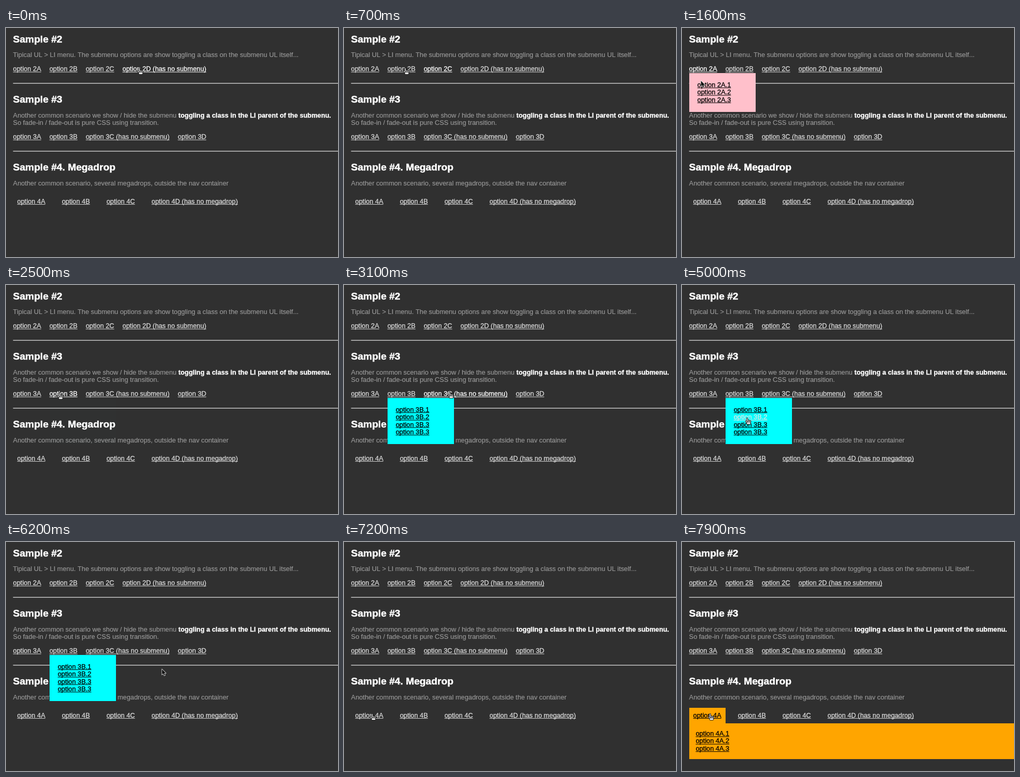
Write an HTML page with a canvas that moves like this. It is 640 px wide and 442 px high and loops after 8000 ms.

```html
<!DOCTYPE html>
<html lang="en">
<head>
<meta charset="utf-8">
<title>Menu samples</title>
<style>
html, body { margin: 0; width: 100%; height: 100%; overflow: hidden; background: #303030; }
canvas { display: block; }
</style>
</head>
<body>
<canvas id="stage" width="640" height="442"></canvas>
<script>
const ctx = document.getElementById('stage').getContext('2d');
const LOOP = 8000, LEFT = 13.6, SIZE = 12.8, LINE = 14.4, ASCENT = 11.2;
const FAMILY = '"Liberation Sans", Arial, Helvetica, sans-serif';
const BODY = SIZE + 'px ' + FAMILY;
const BOLD = 'bold ' + BODY;
const TITLE = 'bold ' + SIZE * 1.5 + 'px ' + FAMILY;

const clamp = v => Math.max(0, Math.min(1, v));
const ease = v => v * v * (3 - 2 * v);

function row(x, base, gap, names) {
  ctx.font = BODY;
  return names.map(text => {
    const link = { text, x, base, w: ctx.measureText(text).width };
    x += link.w + gap;
    return link;
  });
}

// Names the options of one menu; the note follows the option at its index.
const options = (n, noteAt, note) =>
  [...'ABCD'].map((c, i) => `option ${n}${c}` + (i === noteAt ? ` (has no ${note})` : ''));

const menu2 = row(LEFT, 83.2, 16, options(2, 3, 'submenu'));
const menu3 = row(LEFT, 214.2, 16, options(3, 2, 'submenu'));
const menu4 = row(LEFT + 8, 338.6, 32, options(4, 3, 'megadrop'));
const topLinks = [...menu2, ...menu3, ...menu4];

function dropdown(owner, x, y, w, pad, color, open, close, suffixes) {
  const links = [...suffixes].map((s, i) =>
    row(x + pad, y + pad + i * LINE + ASCENT, 0, [`${owner.text}.${s}`])[0]);
  return { owner, x, y, w, h: links.length * LINE + pad * 2, color, open, close, links };
}

const pink = dropdown(menu2[0], LEFT, 86.6, 128, 16, '#ffc0cb', 1150, 2100, '123');
const cyan = dropdown(menu3[1], menu3[1].x, 217.5, 128, 16, '#00ffff', 2500, 6550, '1233');
const mega = dropdown(menu4[0], LEFT, 350, 640, SIZE, '#ffa500', 7350, LOOP + 500, '123');
const drops = [pink, cyan, mega];

// The pointer rests at each stop and glides between them.
const on = (link, part, up = 6) => ({ x: link.x + link.w * part, y: link.base - up });
const stop = (from, to, p) => ({ from, to, ...p });
const stops = [
  stop(0, 250, on(menu2[3], 0.2)),
  stop(1000, 1450, on(menu2[0], 0.55)),
  stop(1600, 1850, { x: 36, y: 101.5 }),
  stop(2350, 2700, on(menu3[1], 0.35)),
  stop(3050, 3500, on(menu3[2], 0.31, 8)),
  stop(4000, 4350, on(menu3[1], 0.35, 7)),
  stop(4800, 5500, on(cyan.links[1], 0.4, 2.5)),
  stop(6100, 6600, { x: 300, y: 245 }),
  stop(7200, LOOP, on(menu4[0], 0.6, 7))
];

function pointer(t) {
  const i = Math.max(1, stops.findIndex(s => t <= s.to));
  const a = stops[i - 1], b = stops[i];
  const k = ease(clamp((t - a.to) / (b.from - a.to)));
  return { x: a.x + (b.x - a.x) * k, y: a.y + (b.y - a.y) * k };
}

const opacity = (d, t) => clamp((t - d.open) / 250) * (1 - clamp((t - d.close) / 250));

const over = (p, l) =>
  p.x >= l.x && p.x <= l.x + l.w && p.y >= l.base - ASCENT && p.y <= l.base + 3.2;

// A hairline outline gives the heavier, smoothed letterforms.
function write(text, x, y, font, color, weight = 0.3) {
  ctx.font = font;
  ctx.fillStyle = ctx.strokeStyle = color;
  ctx.lineWidth = weight;
  ctx.lineJoin = 'round';
  ctx.fillText(text, x, y);
  ctx.strokeText(text, x, y);
}

function drawLink(l, color) {
  write(l.text, l.x, l.base, BODY, color);
  ctx.fillRect(l.x, l.base + 1.3, l.w, 1);
}

function box(x, y, w, h, color) {
  const x0 = Math.round(x), y0 = Math.round(y);
  ctx.fillStyle = color;
  ctx.fillRect(x0, y0, Math.round(x + w) - x0, Math.round(y + h) - y0);
}

const arrow = new Path2D('M.6 .6V11L3 8.8L4.8 12.8L6.6 12L4.9 8.2H8.2Z');
const hand = new Path2D();
for (let i = 0; i < 4; i++) {
  const top = i ? 3.6 + i * 0.5 : 0;
  hand.roundRect(-1 + i * 2, top, 2, 9 - top, 1);
}
hand.roundRect(-3, 5.6, 3, 3, 1.2);
hand.roundRect(-0.8, 7, 7.4, 5, 1.5);

function drawPointer(p, shape, fill, edge) {
  ctx.save();
  ctx.translate(p.x, p.y);
  ctx.lineJoin = 'round';
  ctx.lineWidth = 1.5;
  ctx.strokeStyle = edge;
  ctx.fillStyle = fill;
  ctx.stroke(shape);
  ctx.fill(shape);
  if (shape === hand) {
    ctx.lineWidth = 0.5;
    ctx.stroke(shape);
  }
  ctx.restore();
}

function section(base, title, text) {
  write(title, LEFT, base, TITLE, '#fff', 0.5);
  write(text, LEFT, base + 28.6, BODY, '#999', 0.15);
}

function rule(y) {
  ctx.fillStyle = '#d0d0d0';
  ctx.fillRect(LEFT, y, 640, 1.4);
}

function drawDrop(d, t, lag) {
  ctx.globalAlpha = opacity(d, t);
  box(d.x, d.y, d.w, d.h, d.color);
  if (d === mega) {
    box(LEFT, 319.6, d.owner.w + 16, 30.4, d.color);
    drawLink(d.owner, '#000');
  }
  d.links.forEach(l => drawLink(l, over(lag, l) ? '#e4e4e4' : '#000'));
  ctx.globalAlpha = 1;
}

function draw(t) {
  const now = pointer(t), lag = pointer(Math.max(0, t - 120));
  box(0, 0, 640, 442, '#303030');

  section(27.8, 'Sample #2',
    'Tipical UL > LI menu. The submenu options are show toggling a class on the submenu UL itself...');
  rule(106);
  const intro = 'Another common scenario we show / hide the submenu ';
  section(144.4, 'Sample #3', intro);
  write('toggling a class in the LI parent of the submenu.',
    LEFT + ctx.measureText(intro).width, 173, BOLD, '#fff');
  write('So fade-in / fade-out is pure CSS using transition.', LEFT, 173 + LINE, BODY, '#999', 0.15);
  rule(237);
  section(275.4, 'Sample #4. Megadrop',
    'Another common scenario, several megadrops, outside the nav container');

  topLinks.forEach(l => drawLink(l, over(lag, l) ? '#fff' : '#d8d8d8'));

  const shown = drops.filter(d => opacity(d, t) > 0);
  shown.forEach(d => drawDrop(d, t, lag));

  const links = topLinks.concat(...shown.map(d => d.links));
  if (links.some(l => over(now, l))) drawPointer(now, hand, '#fff', '#111');
  else drawPointer(now, arrow, '#111', '#eee');
}

const start = performance.now();
function tick() {
  draw((performance.now() - start) % LOOP);
  requestAnimationFrame(tick);
}
tick();
</script>
</body>
</html>
```
